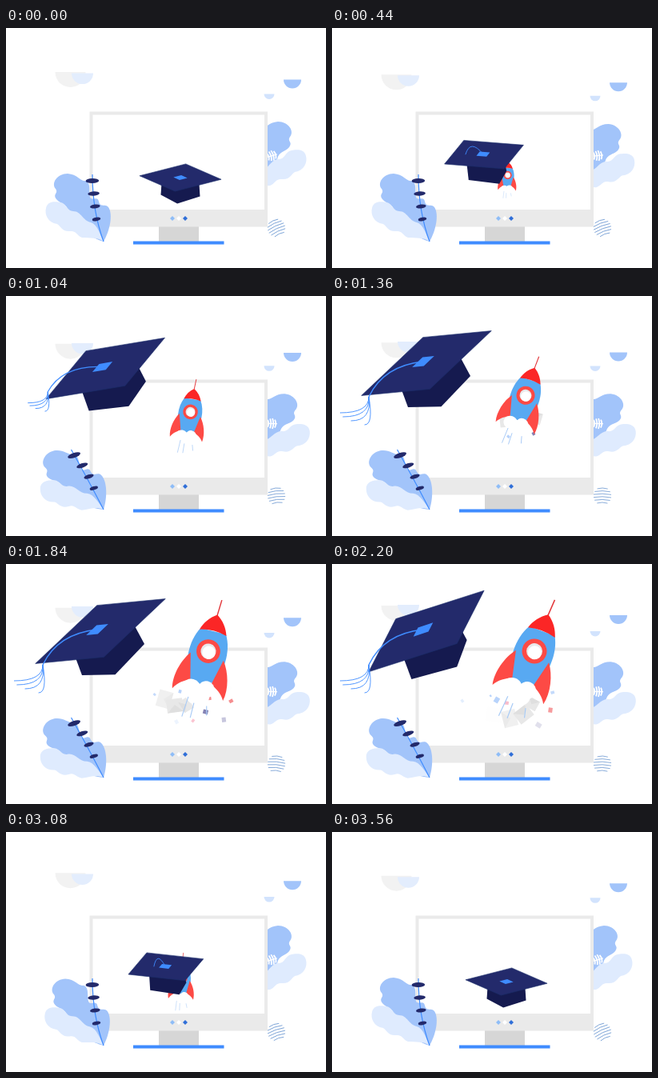
Recreate the animation shown at these times as an HTML page with a canvas. Size 400 by 300 pixels, loop 3.6 s.

```html
<!DOCTYPE html>
<html lang="en">
<head>
<meta charset="utf-8">
<title>Graduation launch</title>
<style>
  html, body { margin: 0; width: 100%; height: 100%; overflow: hidden; background: #fff; }
  canvas { display: block; }
</style>
</head>
<body>
<canvas id="stage" width="400" height="300"></canvas>
<script>
const LOOP = 3600, STEP = 40, TAU = Math.PI * 2, DEG = TAU / 360;
const ctx = document.getElementById('stage').getContext('2d');

const SKY = '#a2c4fa', PALE = '#dfebfe', BLUE = '#3f8cff', NAVY = '#232a6b', DEEP = '#151a4f', RED = '#fd4a45';
const BITS = ['#f58e90', '#b8d3fb', '#8583b4', '#c3dafb', '#f9bccb'];

// Timing
const ramp = (t, from, to) => Math.min(1, Math.max(0, (t - from) / (to - from)));
const ease = u => (1 - Math.cos(Math.PI * u)) / 2;
const pulse = (t, rise, top, fall, end) => ease(ramp(t, rise, top)) - ease(ramp(t, fall, end));
const wave = (t, lag) => Math.sin(TAU * t / LOOP - lag);

// Drawing
function fill(path, color) { ctx.fillStyle = color; ctx.fill(new Path2D(path)); }

function stroke(path, color, width) {
  ctx.strokeStyle = color;
  ctx.lineWidth = width;
  ctx.stroke(new Path2D(path));
}

function oval(x, y, rx, ry, color, tilt = 0, end = TAU) {
  ctx.beginPath();
  ctx.ellipse(x, y, rx, ry, tilt * DEG, 0, end);
  ctx.fillStyle = color;
  ctx.fill();
}

function rect(x, y, w, h, color) { ctx.fillStyle = color; ctx.fillRect(x, y, w, h); }

function placed(x, y, deg, sx, sy, draw) {
  ctx.save();
  ctx.translate(x, y);
  ctx.rotate(deg * DEG);
  ctx.scale(sx, sy);
  draw();
  ctx.restore();
}

const polygon = points => 'M' + points.map(p => p.join(' ')).join('L') + 'Z';

function clouds(t) {
  const half = (x, y, r, color) => oval(x, y, r, r, color, 0, Math.PI);
  half(80.5, 55 + 4.8 * wave(t, 0), 19, '#f2f2f2');
  half(95.5, 55 + 4.7 * wave(t, -0.35), 13.5, '#e3edfd');
  half(358, 66 + 5 * wave(t, 0.3), 11, SKY);
  half(329, 84.3 + 3.2 * wave(t, 0.6), 6.5, '#d2e3fd');
}

function darkLeaf() {
  fill('M0 0C8-14 12-34 6-43C2-48-4-42-6-50C-7-58-16-50-17-56C-19-62-15-74-23-76' +
    'C-29-75-32-84-45-85C-58-85-66-73-60-66C-56-60-64-60-59-53C-54-47-46-48-44-38C-30-14-14-4 0 0Z', SKY);
}

function paleLeaf() {
  fill('M0 0C-8-6-16-4-27-5C-34-8-34-14-42-13C-52-12-54-20-58-22C-70-24-74-34-72-42' +
    'C-70-52-58-50-54-49C-46-48-46-38-38-38C-28-38-26-26-16-24C-8-22-4-8 0 0Z', PALE);
}

// The bend grows with height along the stem.
function sprig(bend) {
  const turned = (x, y, deg) => {
    const c = Math.cos(deg * DEG), s = Math.sin(deg * DEG);
    return [x * c - y * s, x * s + y * c];
  };
  stroke(`M0 0Q${turned(-14, -38, bend * 0.4)} ${turned(-14, -84, bend * 1.05)}`, BLUE, 1.2);
  for (let i = 0; i < 4; i++) {
    const h = 28 + 16 * i, deg = bend * h / 76;
    const [x, y] = turned(-9 - 1.7 * i, -h, deg);
    oval(x, y, 5.3 + i, 2.2 + 0.27 * i, NAVY, deg - 10 + 3 * i);
  }
}

function fern() {
  stroke('M-14 0H6', '#fff', 1.4);
  for (let x = -8; x <= 4; x += 3) {
    const r = 7 - Math.abs(x) * 0.5;
    stroke(`M${x - 1} ${-r}Q${x + 1.5} 0 ${x - 1} ${r}`, '#fff', 1.8);
  }
}

function ball() {
  for (let y = -9; y <= 9; y += 3.6) {
    const w = Math.sqrt(124 - y * y);
    stroke(`M${-w} ${y}Q0 ${y - 2} ${w} ${y}`, '#6f9ad2', 0.8);
  }
}

function monitor() {
  rect(191, 248, 50, 19, '#d6d6d6');
  rect(159, 266.5, 113.5, 4, BLUE);
  rect(104.5, 104.5, 222.5, 144, '#eaeaea');
  rect(108.5, 108.5, 214.5, 118.5, '#fff');
  ['#8fbdf7', '#fff', '#2f6fd8'].forEach((color, i) =>
    fill(`M${205 + 8 * i} 238l3-3 3 3-3 3Z`, color));
}

// Letters and confetti fan out below the rocket, spread by the golden ratio.
function debris(t) {
  for (let i = 0; i < 18; i++) {
    const age = (t - 1000 - 60 * i) / 850;
    if (age <= 0 || age >= 1) continue;
    const letter = i % 3 === 0, angle = (10 + 160 * (i * 0.618 % 1)) * DEG;
    const reach = (40 + 40 * (i * 0.37 % 1)) * age ** 0.6;
    const size = (letter ? 21 : 4 + i % 4) * Math.min(1, 0.4 + age);
    ctx.globalAlpha = Math.min(1, (1 - age) * 3);
    placed(230 + reach * Math.cos(angle), 148 + reach * Math.sin(angle), 40 * age + 25 * i, size, size, () => {
      rect(-0.5, -0.42, 1, 0.84, letter ? '#e8e8e8' : BITS[i % BITS.length]);
      if (letter) fill('M-.5-.42L0 .05L.5-.42Z', 'rgba(150,150,150,.1)');
    });
    ctx.globalAlpha = 1;
  }
}

function rocket(t) {
  const rise = pulse(t, 0, 1880, 2480, 3280);
  const size = 0.13 + 0.87 * Math.min(ramp(t, 0, 1930), 1 - ease(ramp(t, 2500, 3500)));
  const tilt = rise * (18 + 4 * Math.sin(TAU * (t - 1120) / 960));
  placed(219 + 34 * rise * rise, 195 - 86 * rise, tilt, size, size, () => {
    stroke('M0-48L1-69', '#e2363a', 1.5);
    fill('M-17-27C-29-6-26 22-16 45H16C26 22 29-6 17-27Z', '#58a9f2');
    fill('M0-49C9-43 15-35 18-25Q0-30-18-25C-15-35-9-43 0-49Z', '#fb2626');
    oval(0, 0, 15.5, 15.5, RED);
    oval(0, 0, 10, 10, '#e9e9ea');
    oval(1, 1.5, 8.5, 8.5, '#fff');
    for (const side of [-1, 1]) placed(0, 0, 0, side, 1, () =>
      fill('M22 7C32 20 38 42 34 58C29 49 22 45 14 41Z', RED));
    oval(-10, 51, 12, 11, '#fff');
    oval(9, 49, 11, 11, '#fff');
    oval(0, 58, 16, 14, '#fff');
    const d = t % 320 / 320 * 5;
    stroke(`M-11 ${60 + d}l-2 27M-2 ${66 + d}v20M15 ${66 + d}l3 12`, '#a9cbf6', 1.2);
  });
}

function cap(t) {
  const lift = pulse(t, 0, 1240, 2430, 3333);
  const swell = pulse(t, 200, 1360, 2280, 3180);
  const drop = pulse(t, 600, 1300, 2500, 3050);
  const early = pulse(t, 0, 640, 640, 1340), late = pulse(t, 1840, 2560, 2900, 3400);

  // The board is a square, turned about its axis, seen flat, then rolled.
  const yaw = (7.5 - 43 * early - 48 * late) * DEG, roll = -29 * swell * DEG;
  const radius = 51.5 + 40 * swell, flat = 0.335 + 0.06 * (early + late);
  const cx = 218 - 100 * lift, cy = 187 - 103 * lift;
  const corner = (i, k, dx = 0, dy = 0) => {
    const a = yaw + i * TAU / 4, x = radius * k * Math.cos(a), y = radius * k * flat * Math.sin(a);
    return [cx + dx + x * Math.cos(roll) - y * Math.sin(roll), cy + dy + x * Math.sin(roll) + y * Math.cos(roll)];
  };
  const square = (k, dx, dy) => polygon([0, 1, 2, 3].map(i => corner(i, k, dx, dy)));

  const dx = 16 * lift, dy = 22.5 + 13 * lift;
  const rim = [0, 1, 2].map(i => corner(i, i === 1 ? 0.58 : 0.48, dx, dy));
  fill(polygon([corner(0, 0.45), ...rim, corner(2, 0.45)]), DEEP);
  fill(square(1), NAVY);
  stroke(square(1), '#1c2f6c', 0.6);

  const bx = cx - 4 * lift, by = cy - 2 * lift;
  fill(square(0.17, bx - cx, by - cy), BLUE);
  if (lift < 0.1) return;
  const ex = cx - 72 * Math.min(1, 1.15 * lift), ey = cy + 42 * drop;
  const hx = cx + 0.74 * (ex - cx), hy = ey - 20 - 19 * drop;
  stroke(`M${bx} ${by}Q${hx} ${hy} ${ex} ${ey}`, BLUE, 0.9 + 0.5 * drop);
  for (let i = 0; i < 4; i++) {
    const x = (i * i * 3.4 - 36) * drop, y = (20 + 5 * i) * drop;
    stroke(`M${ex} ${ey}Q${ex + 2 * i * drop} ${ey + y} ${ex + x} ${ey + y}`, BLUE, 0.9);
  }
}

function draw(t) {
  const left = -12 * pulse(t, 480, 760, 2450, 3300);
  const stem = -18 * pulse(t, 480, 760, 2400, 3080);
  const right = 6 * pulse(t, 0, 760, 2200, 3100);
  rect(0, 0, 400, 300, '#fff');
  clouds(t);
  placed(295, 202, right, -1, 1, darkLeaf);
  placed(303, 202, right * 1.2, -1, 1, paleLeaf);
  placed(333, 159.5, -16 + right * 2.8, 1, 1, fern);
  placed(338, 250, -10 - 15 * Math.cos(TAU * t / LOOP), 1, 1, ball);
  monitor();
  placed(122, 267, left, 1, 1, darkLeaf);
  placed(122, 267, left, 1, 1, paleLeaf);
  placed(122, 267, 0, 1, 1, () => sprig(stem));
  debris(t);
  rocket(t);
  cap(t);
}

const start = performance.now();
function tick() {
  const t = (performance.now() - start) % LOOP;
  draw(Math.floor(t / STEP) * STEP);
  requestAnimationFrame(tick);
}
tick();
</script>
</body>
</html>
```
